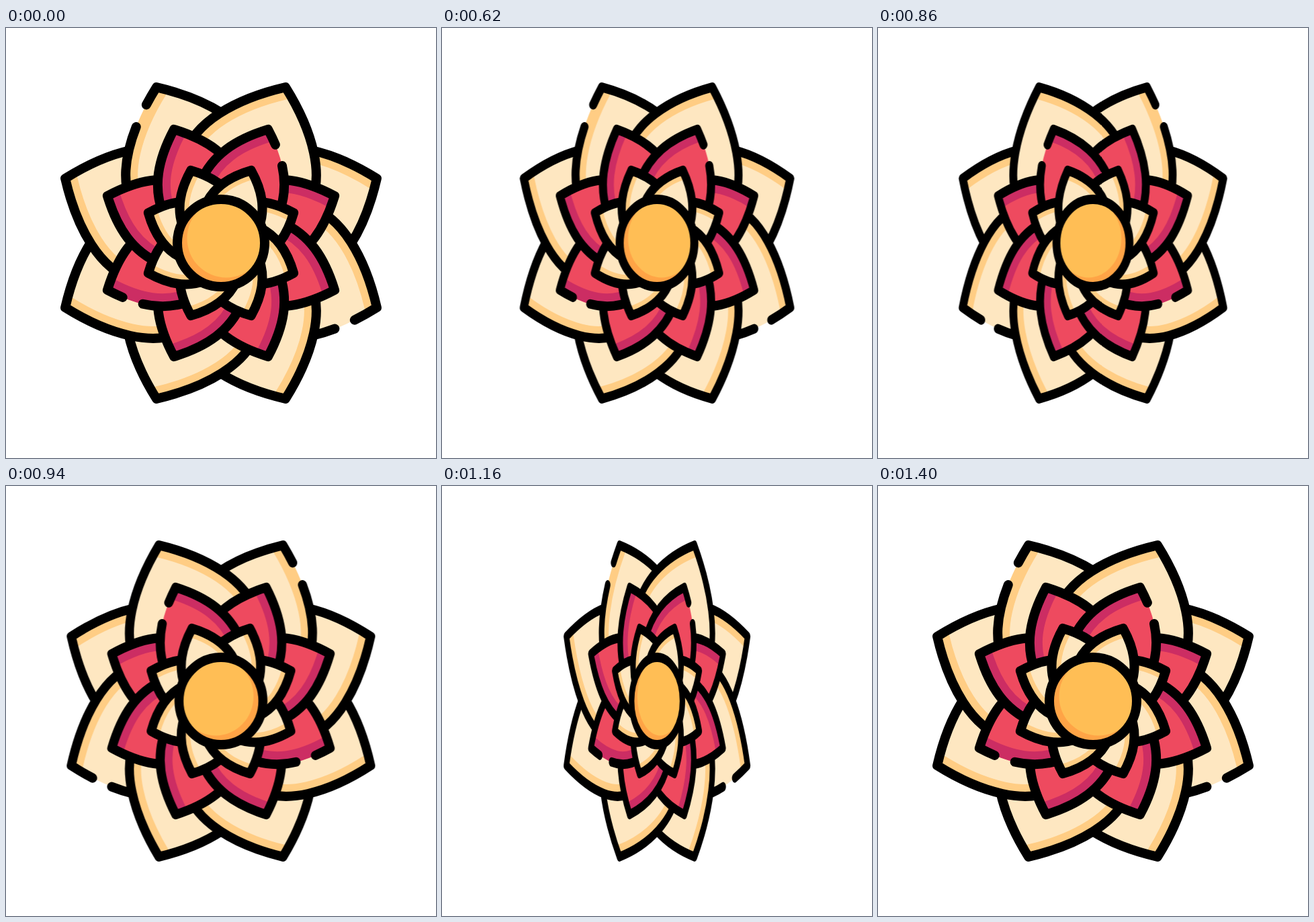
Recreate the animation shown at these times as an HTML page. Size 640 by 640 pixels, loop 1.97 s.

```html
<!DOCTYPE html>
<html lang="en">
<head>
<meta charset="utf-8">
<title>Flower flip</title>
<style>
  html, body { margin: 0; width: 100%; height: 100%; overflow: hidden; background: #fff; }
  svg { display: block; width: 100%; height: 100%; }
</style>
</head>
<body>
<svg id="flower" viewBox="-320 -320 640 640"></svg>
<script>
const OUTLINE = 'stroke="#000" stroke-width="14" stroke-linecap="round" stroke-linejoin="round"';

// Half profile of a petal pointing up: tip, two control points, base.
// Gaps are dash patterns on an outline of length 200 with the tip at 100.
const rings = [
  { profile: [[0, -251], [63, -206], [106, -150], [100, -100]],
    light: '#fee7c1', shade: '#ffcd84', band: 36,
    gaps: { 1: '120 17 63', 6: '65 19 116' } },
  { profile: [[0, -183], [40, -150], [62, -116], [63, -72]],
    light: '#ee4a5f', shade: '#cc2d63', band: 38,
    gaps: { 4: '57 24 119', 7: '119 25 56' } },
  { profile: [[0, -117], [24, -98], [42, -73], [43, -44]],
    light: '#fee7c1', shade: '#ffcd84', band: 28,
    gaps: {} }
];

function ringMarkup({ profile: [tip, c1, c2, base], light, shade, band, gaps }, index) {
  const left = ([x, y]) => [-x, y];
  const edge = `M${left(base)} C${left(c2)} ${left(c1)} ${tip}`;
  const petal = `${edge} C${c1} ${c2} ${base}`;
  const clip = `petal${index}`;
  let out = `<clipPath id="${clip}"><path d="${petal}Z"/></clipPath>`;
  // The lowest petal is at the upper right; the others overlap it clockwise.
  for (let i = 0; i < 8; i++) {
    const dash = gaps[i] ? `stroke-dasharray="${gaps[i]}"` : '';
    out += `<g transform="rotate(${67.5 + 45 * i})" fill="none">
      <path d="${petal}Z" fill="${light}"/>
      <path d="${edge}" stroke="${shade}" stroke-width="${band}" clip-path="url(#${clip})"/>
      <path d="${petal}" pathLength="200" ${dash} ${OUTLINE}/>
    </g>`;
  }
  return out;
}

const center = `
  <clipPath id="disc"><circle r="65"/></clipPath>
  <circle r="65" fill="#ffa446"/>
  <circle cx="8" cy="-7" r="58.5" fill="#ffbe55" clip-path="url(#disc)"/>
  <circle r="65" fill="none" ${OUTLINE}/>`;

const flower = document.getElementById('flower');
flower.innerHTML = rings.map(ringMarkup).join('') + center;

// Ease-in-out, cubic-bezier(.42, 0, .58, 1), solved by bisection.
function easeInOut(x) {
  let low = 0, high = 1;
  for (let i = 0; i < 30; i++) {
    const s = (low + high) / 2, r = 1 - s;
    if (1.26 * r * r * s + 1.74 * r * s * s + s * s * s < x) low = s;
    else high = s;
  }
  return low * low * (3 - 2 * low);
}

const LOOP = 1970, STEP = 20, FIRST = 460, LAST = 1400;

// One full turn about the vertical axis, with a short pause near the middle.
function turnScale(time) {
  const progress = (time - (time < 990 ? 414 : 430)) / 1000;
  return Math.cos(2 * Math.PI * easeInOut(progress));
}

const pose = (time, scale) => ({
  offset: Math.max(0, time - 0.5) / LOOP,
  transform: `scaleX(${scale.toFixed(5)})`,
  easing: 'step-end'
});

const keyframes = [pose(0, 1)];
for (let time = FIRST; time < LAST; time += STEP) keyframes.push(pose(time, turnScale(time)));
keyframes.push(pose(LAST, 1), { offset: 1, transform: 'scaleX(1)' });
flower.animate(keyframes, { duration: LOOP, iterations: Infinity });
</script>
</body>
</html>
```
